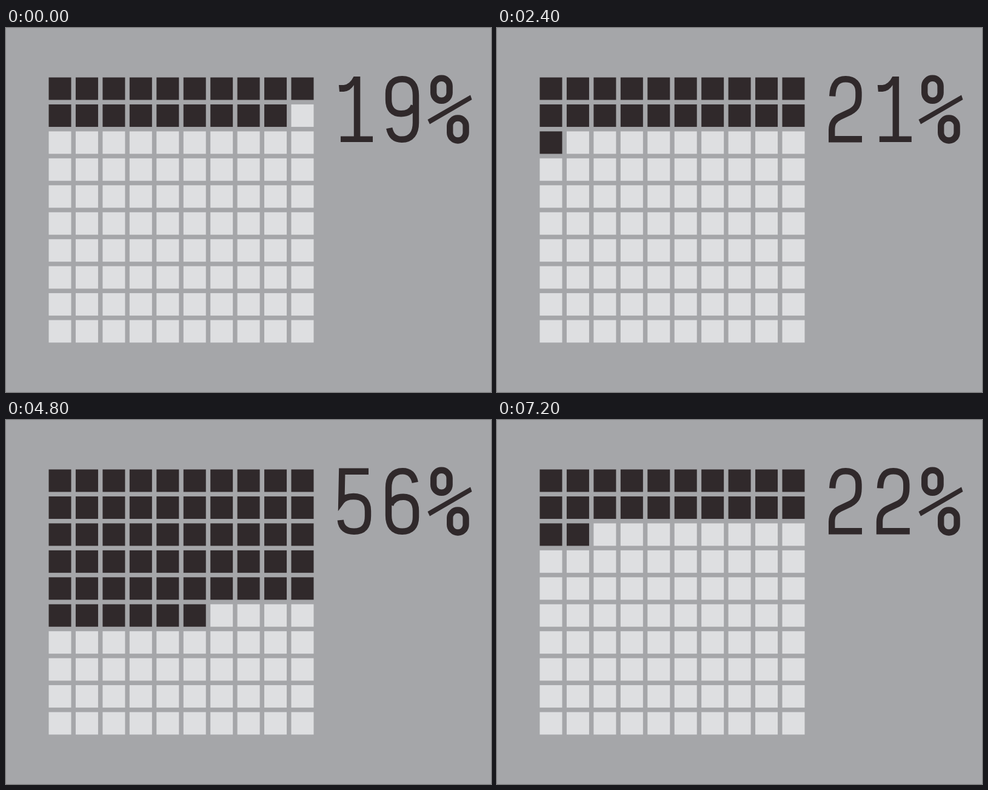
Recreate the animation shown at these times as an HTML page with a canvas. Size 800 by 600 pixels, loop 8 s.

```html
<!DOCTYPE html>
<html lang="en">
<head>
<meta charset="utf-8">
<title>Percent grid</title>
<style>
html, body { margin: 0; width: 100%; height: 100%; overflow: hidden; background: #a5a6a9; }
canvas { display: block; }
</style>
</head>
<body>
<canvas id="stage" width="800" height="600"></canvas>
<script>
const ctx = document.getElementById('stage').getContext('2d');
const BACK = '#a5a6a9', DARK = '#30292b', LIGHT = '#dedfe1';
const STEP = 800;
const VALUES = [19, 45, 92, 21, 76, 88, 56, 14, 5, 22];
const ADVANCE = 78.8, TEXT_X = 545;

// Condensed numerals: "line" outlines are stroked, "fill" outlines are filled.
const NINE = 'M8.4 165 C11 178 18 183.8 29 183.8 C45 183.8 52.2 173 52.2 156 V111 C52.2 94 45 84.2 29.7 84.2 C14.5 84.2 7.2 93 7.2 108 V118 C7.2 133 14 141.2 28 141.2 C39 141.2 46 136 49 128';
const GLYPHS = {
  1: { fill: 'M4 94 L12 94 Q22 93 28.5 80 H39.3 V178.6 H60 V188 H7 V178.6 H28.8 V94 Q23 104 12 105 L5 105 Z' },
  2: { line: 'M8.2 112.5 C9 94 15 84.2 30 84.2 C45 84.2 51.5 93 51.5 106 V112 C51.5 127 47 133 38 138 L20 146.5 C11 151 7.2 157 7.2 168 V183.3 H57' },
  4: { fill: 'M39 80 H49.5 V149.5 H62 V158.8 H49.5 V188 H39 V158.8 H.5 V149.5 Z M39 99 L11.5 149.5 H39 Z' },
  5: { line: 'M53 84.8 H9.3 L8.3 134 C12 129 19 126 28 126 C44 126 52 134 52 150 V158 C52 175 45 183.8 29 183.8 C16 183.8 8 178 6.8 165' },
  6: { line: NINE, turn: true },
  7: { fill: 'M2 80 H58 V91 C44 120 33 160 30 188 H19 C22 160 33 120 46.5 89.8 H2 Z' },
  8: { line: 'M29.7 84.2 C43 84.2 50 91 50 104 V109 C50 122 43 130 29.7 130 C16.5 130 9.5 122 9.5 109 V104 C9.5 91 16.5 84.2 29.7 84.2 Z M29.7 130 C45 130 52.2 139 52.2 153 V161 C52.2 175 45 183.8 29.7 183.8 C14.5 183.8 7.2 175 7.2 161 V153 C7.2 139 14.5 130 29.7 130 Z' },
  9: { line: NINE }
};
for (const g of Object.values(GLYPHS)) g.path = new Path2D(g.line || g.fill);

const slash = new Path2D('M766 110.5 L768.5 118 L699 158.5 L695.5 151 Z');

function drawDigit(digit, x) {
  const g = GLYPHS[digit];
  ctx.save();
  ctx.translate(x, 0);
  if (g.turn) {
    ctx.translate(59.4, 268);
    ctx.rotate(Math.PI);
  }
  if (g.line) ctx.stroke(g.path);
  else ctx.fill(g.path, 'evenodd');
  ctx.restore();
}

function drawRing(x, y) {
  ctx.beginPath();
  ctx.roundRect(x, y, 26.4, 37, 13);
  ctx.stroke();
}

function drawPercent(dx) {
  ctx.save();
  ctx.translate(dx, 0);
  drawRing(705.2, 82.8);
  drawRing(732.2, 148.5);
  ctx.fill(slash);
  ctx.restore();
}

function drawGrid(count) {
  for (let i = 0; i < 100; i++) {
    const col = i % 10, row = Math.floor(i / 10);
    ctx.fillStyle = i < count ? DARK : LIGHT;
    ctx.fillRect(70.5 + col * 400 / 9, 81.5 + row * 400 / 9, 37, 37);
  }
}

function render(time) {
  const value = VALUES[Math.floor(time / STEP) % VALUES.length];
  const digits = String(value);
  ctx.fillStyle = BACK;
  ctx.fillRect(0, 0, 800, 600);
  drawGrid(value);
  ctx.fillStyle = ctx.strokeStyle = DARK;
  ctx.lineWidth = 10.4;
  [...digits].forEach((d, i) => drawDigit(d, TEXT_X + i * ADVANCE));
  drawPercent((digits.length - 2) * ADVANCE);
}

const start = performance.now();
function tick() {
  render(performance.now() - start);
  requestAnimationFrame(tick);
}
tick();
</script>
</body>
</html>
```
